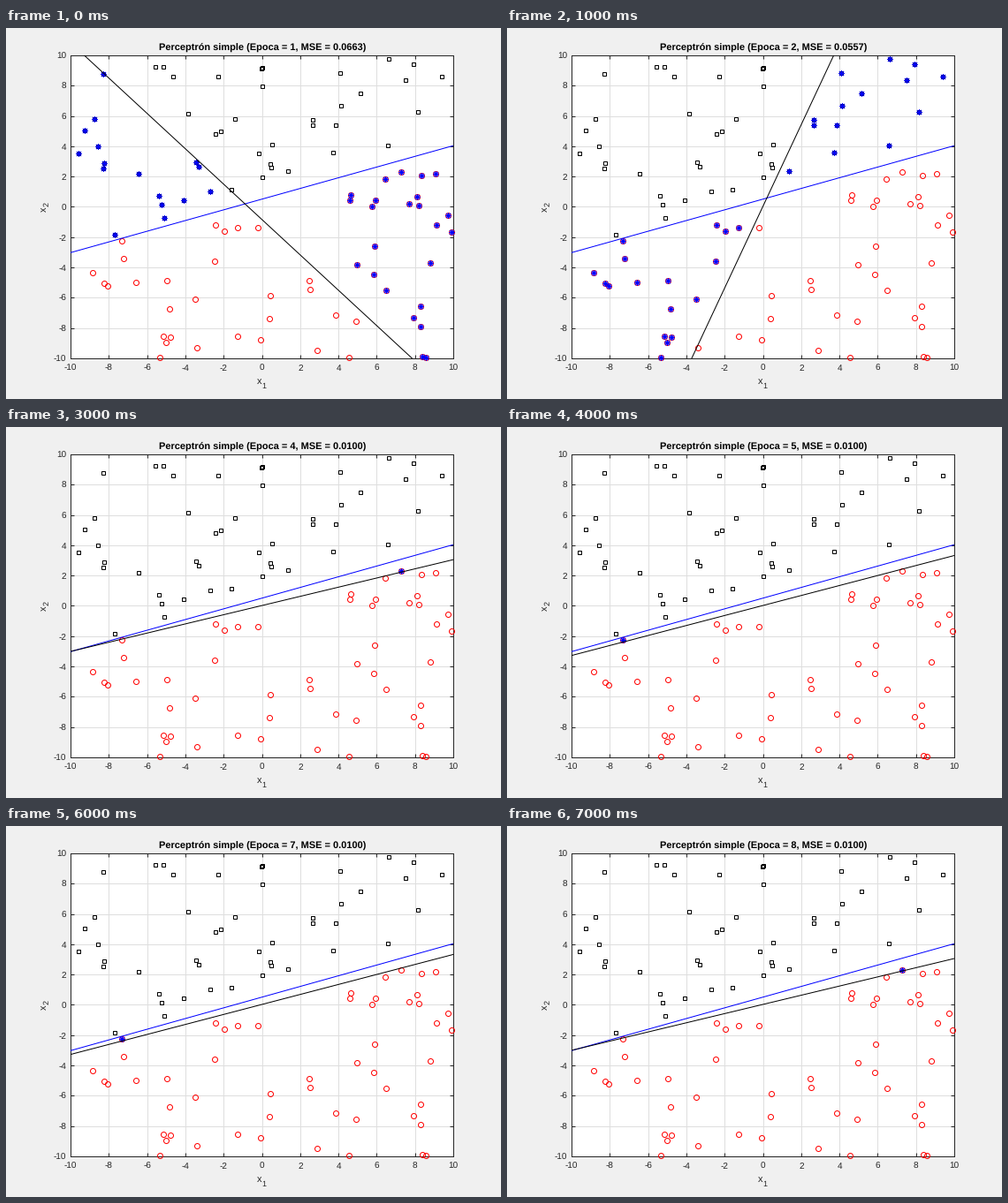
Animation, 560 px wide and 420 px high, one loop 8 s. Source, as a matplotlib script:

```python
import matplotlib.pyplot as plt
import numpy as np
from matplotlib.animation import FuncAnimation

W, H, DPI = 560, 420, 100
PX = 72 / DPI  # points per pixel
LEFT, RIGHT, TOP, BOTTOM = 73, 506, 31, 374
INK = "#262626"
SLOPE, ICEPT = .353, .51  # true boundary

plt.rcParams["font.family"] = "Liberation Sans"
plt.rcParams["text.hinting"] = "none"

rng = np.random.default_rng(4)


def scatter(count, side, near):
    """Points next to the boundary, then random ones clear of it."""
    pts = list(near)
    while len(pts) < count:
        x, y = rng.uniform(-10, 10, 2)
        if side * (y - SLOPE * x - ICEPT) > 1.2:
            pts.append((x, y))
    return np.array(pts)


squares = scatter(47, 1, [(-7.69, -1.84), (-5.1, -.73), (-4.09, .44),
                          (-1.59, 1.14), (3.72, 3.59), (6.58, 4.05)])
circles = scatter(53, -1, [(-7.32, -2.25), (-2.42, -1.2), (-.21, -1.37),
                           (4.6, .44), (6.44, 1.84), (7.27, 2.3),
                           (8.34, 2.07)])


def boundary(epoch):
    """Slope, intercept and MSE of the learned line."""
    if epoch == 1:
        return -1.1675, -.834, .0663
    if epoch == 2:
        return 2.695, .03, .0557
    # Settles into a two-step cycle around the two hardest points
    slope = .33 if epoch % 2 else .303
    return slope, .02 + .002 * (epoch - 3), .01


def missed(slope, icept):
    def above(pts):
        return pts[:, 1] > slope * pts[:, 0] + icept
    return np.vstack([squares[~above(squares)], circles[above(circles)]])


fig = plt.figure(figsize=(W / DPI, H / DPI), dpi=DPI, facecolor="#f0f0f0")
ax = fig.add_axes([LEFT / W, 1 - BOTTOM / H,
                   (RIGHT - LEFT) / W, (BOTTOM - TOP) / H])


def label(x, y, text, size=10, color=INK, **kw):
    return fig.text(x / W, 1 - y / H, text, fontsize=size * PX, color=color,
                    va="baseline", **kw)


ticks = range(-10, 11, 2)
ax.set(xlim=(-10, 10), ylim=(-10, 10), xticks=ticks, yticks=ticks)
ax.set_axisbelow(True)
ax.grid(color="#dedede", lw=PX)
ax.tick_params(direction="in", top=True, right=True, length=4.3 * PX,
               width=PX, color=INK, labelbottom=False, labelleft=False)
for spine in ax.spines.values():
    spine.set(color=INK, linewidth=PX)

for t in ticks:
    part = (t + 10) / 20
    label(LEFT + part * (RIGHT - LEFT), 387.5, str(t), ha="center")
    label(68, BOTTOM - part * (BOTTOM - TOP) + 4, str(t), ha="right")

label(283.5, 403, "x", 11)
label(289.5, 408, "1", 9)
upright = dict(rotation=90, rotation_mode="anchor")
label(46, 208, "x", 11, **upright)
label(49, 202.3, "2", 9, **upright)
title = label(290, 25, "", 11, "black", weight="bold", ha="center")


def markers(pts, shape, size, color, z):
    return ax.plot(*pts.T, ls="", marker=shape, ms=size * PX, mfc="none",
                   mec=color, mew=PX, clip_on=False, snap=False, zorder=z)[0]


markers(squares, "s", 5, "black", 3)
markers(circles, "o", 6, "red", 3)
stars = markers(squares[:0], (8, 2, 0), 7, "blue", 4)

ends = np.array([-10, 10])
ax.plot(ends, SLOPE * ends + ICEPT, color="blue", lw=PX, zorder=5)
learned, = ax.plot([], [], color="black", lw=PX, zorder=6)


def draw(i):
    epoch = i + 1
    slope, icept, mse = boundary(epoch)
    learned.set_data(ends, slope * ends + icept)
    stars.set_data(*missed(slope, icept).T)
    title.set_text(f"Perceptrón simple (Epoca = {epoch}, MSE = {mse:.4f})")
    return learned, stars, title


anim = FuncAnimation(fig, draw, frames=8, interval=1000, repeat=True,
                     init_func=lambda: draw(0), blit=False)
plt.show()
```
